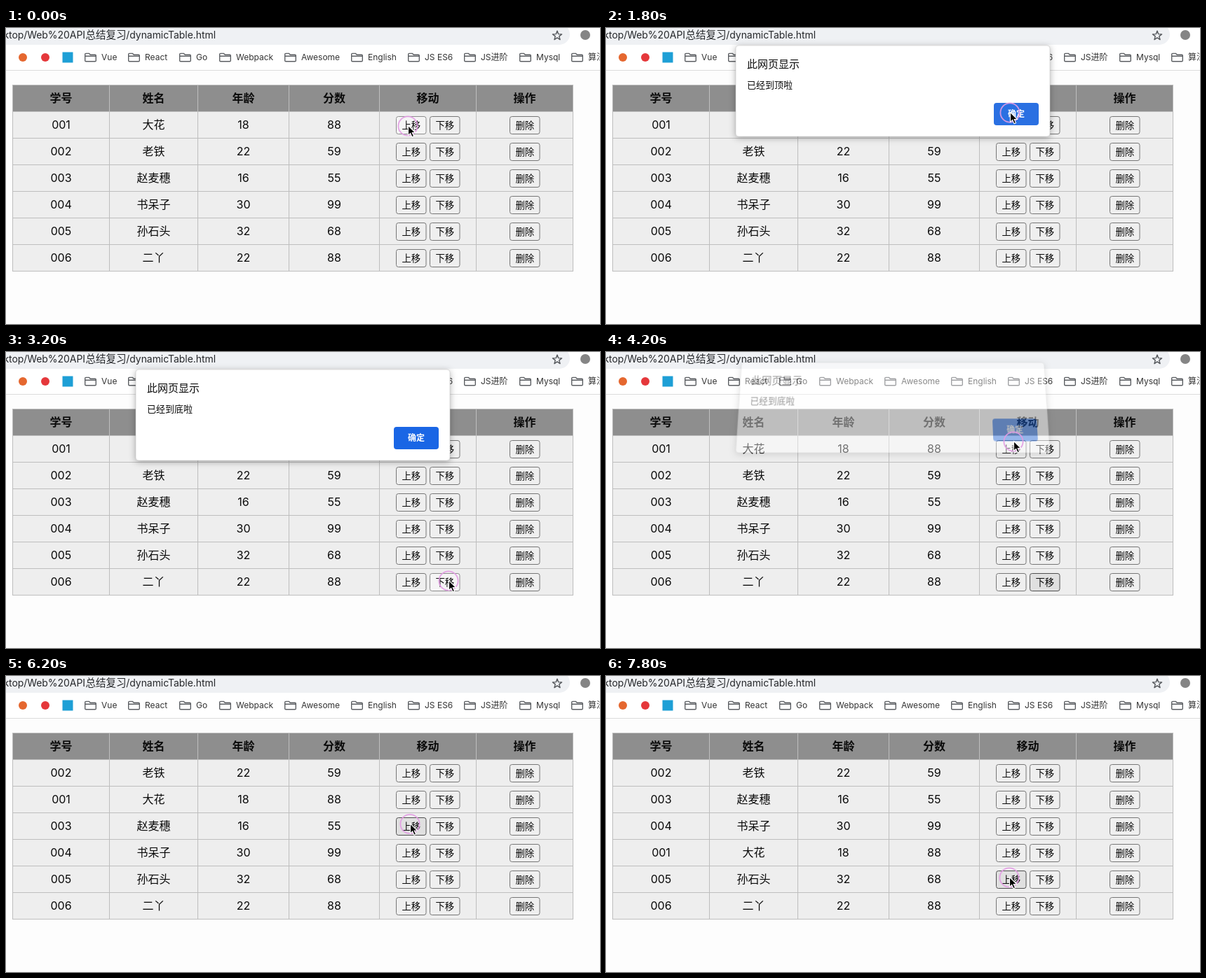
An HTML page for the animation above (8000 ms loop, 847 by 423 pixels).

```html
<!DOCTYPE html>
<html lang="zh-CN">
<head>
<meta charset="utf-8">
<title>dynamicTable</title>
<style>
  html, body { margin: 0; width: 100%; height: 100%; overflow: hidden; background: #fdfdfd; }
  svg {
    position: absolute; left: 0; top: 0; overflow: hidden;
    font-family: Inter, "Noto Sans CJK SC", "Noto Sans CJK", sans-serif;
  }
  #dialog {
    left: 185px; top: 25px; overflow: visible; transform-origin: 50% 100%;
    filter: drop-shadow(0 2px 5px rgba(0, 0, 0, .3));
  }
  #dialog.closing {
    opacity: .42;
    transform: translateY(-11px) perspective(600px) rotateX(10deg) scaleY(1.046);
  }
</style>
</head>
<body>
<svg id="page" width="847" height="423"></svg>
<svg id="dialog" width="448" height="130"></svg>
<svg id="pointer" width="847" height="423"></svg>
<script>
const STEP = 200, STEPS = 40, ROW = 38, TOP = 138.5;
const COLS = [9.5, 147.5, 273.5, 403.5, 532.5, 670.5, 808.5];
const HEADS = ['学号', '姓名', '年龄', '分数', '移动', '操作'];
const STUDENTS = [
  ['001', '大花', 18, 88],
  ['002', '老铁', 22, 59],
  ['003', '赵麦穗', 16, 55],
  ['004', '书呆子', 30, 99],
  ['005', '孙石头', 32, 68],
  ['006', '二丫', 22, 88]
];
const FOLDERS = [
  [112, 'Vue'], [174, 'React'], [247, 'Go'], [304, 'Webpack'], [397, 'Awesome'],
  [492, 'English'], [573, 'JS ES6'], [653, 'JS进阶'], [732, 'Mysql'], [806, '算法']
];
// pointer stops: step, x, y
const STOPS = [
  [0, 573, 140], [3, 573, 140], [6, 578, 123], [9, 576, 121], [10, 577, 122],
  [12, 635, 326], [14, 632, 327], [16, 631, 327], [19, 582, 128], [21, 581, 128],
  [23, 580, 132], [26, 576, 174], [28, 576, 174], [30, 576, 212], [32, 576, 211],
  [34, 576, 250], [36, 576, 250], [38, 575, 288], [39, 575, 288]
];
const SWAPS = [28, 32, 36];
const ALERTS = [
  { open: 1, close: 10, press: 0, row: 0, col: 0, text: '已经到顶啦' },
  { open: 15, close: 21, press: 14, row: 5, col: 1, text: '已经到底啦' }
];

const $ = id => document.getElementById(id);
const page = $('page'), dialog = $('dialog'), pointer = $('pointer');

function add(parent, tag, attrs, text) {
  const el = document.createElementNS('http://www.w3.org/2000/svg', tag);
  for (const k in attrs) el.setAttribute(k, attrs[k]);
  if (text !== undefined) el.textContent = text;
  return parent.appendChild(el);
}
const rect = (p, x, y, width, height, fill, more) =>
  add(p, 'rect', { x, y, width, height, fill, ...more });
const label = (p, x, y, size, text, more) =>
  add(p, 'text', { x, y, 'font-size': size, fill: '#0a0a0a', ...more }, text);
const mid = { 'text-anchor': 'middle' };
const end = { 'text-anchor': 'end' };
const center = i => (COLS[i] + COLS[i + 1]) / 2;

function drawBrowser() {
  rect(page, 0, 0, 847, 423, '#fdfdfd');
  rect(page, 0, 0, 847, 60, '#fff');
  rect(page, -30, -6, 834, 30, '#eff1f4', { rx: 15 });
  rect(page, 0, 60, 847, 1, '#dcdcdc');
  const url = { fill: '#26282b', 'letter-spacing': -.06 };
  label(page, 113, 15, 14, 'sktop/Web%20API', { ...url, ...end });
  label(page, 113.5, 15, 14.5, '总结复习', { fill: url.fill });
  label(page, 299, 15, 14, '/dynamicTable.html', { ...url, ...end });

  const star = Array.from({ length: 10 }, (_, i) => {
    const r = i % 2 ? 2.9 : 6.9, a = i * Math.PI / 5;
    return [786 + r * Math.sin(a), 11 - r * Math.cos(a)].map(v => v.toFixed(2));
  });
  add(page, 'polygon', {
    points: star.join(' '), fill: 'none', stroke: '#55585c',
    'stroke-width': 1.4, 'stroke-linejoin': 'round'
  });
  add(page, 'circle', { cx: 826, cy: 10, r: 7, fill: '#858585' });
  add(page, 'circle', { cx: 24, cy: 42, r: 6, fill: '#e5672f' });
  add(page, 'circle', { cx: 56, cy: 42, r: 6, fill: '#e5383b' });
  rect(page, 80.5, 34.5, 15, 15, '#1e9fd6');

  for (const [x, name] of FOLDERS) {
    add(page, 'path', {
      d: `M${x + .7} 37.6q0-1.2 1.2-1.2h4.6l1.8 1.8h6.8q1.2 0 1.2 1.2v7.2q0 1.2-1.2 1.2h-13.2q-1.2 0-1.2-1.2zM${x + .7} 40.2h15.6`,
      fill: 'none', stroke: '#5c5f63', 'stroke-width': 1.4
    });
    label(page, x + 24, 46.3, 12, name, { fill: '#333' });
  }
}

const rows = [], buttons = [];

function drawTable() {
  rect(page, 9.5, 81.5, 799, 38, '#8e8e8e');
  rect(page, 9.5, 119.5, 799, 228, '#eee');
  let d = '';
  for (let i = 0; i < 8; i++) d += `M9 ${81.5 + ROW * i}H809`;
  for (const x of COLS) d += `M${x} 81V348`;
  add(page, 'path', { d, stroke: '#bebebe', fill: 'none' });

  HEADS.forEach((h, i) => label(page, center(i), 105.7, 16, h, { ...mid, 'font-weight': 700 }));
  STUDENTS.forEach((s, r) => {
    const g = add(page, 'g', {});
    s.forEach((v, i) => label(g, center(i), TOP + 5.5, 16, v, mid));
    rows.push(g);
    buttons.push([[556.5, '上移'], [604.5, '下移'], [718.5, '删除']].map(([x, name]) => {
      const y = 127 + ROW * r;
      const box = rect(page, x, y - .5, 42.5, 25, '#efefef', { rx: 3 });
      label(page, x + 21.3, y + 16.8, 13.4, name, mid);
      return { box, x, y };
    }));
  });
}

function drawDialog() {
  rect(dialog, 0, 0, 448, 130, '#fff', { rx: 4, stroke: '#c4c4c4', 'stroke-width': .6 });
  label(dialog, 16, 32, 15, '此网页显示');
  const message = label(dialog, 16, 60.7, 13, '');
  const ok = rect(dialog, 368, 82, 64, 32, '#1a66e5', { rx: 4 });
  label(dialog, 400, 102, 12, '确定', { ...mid, fill: '#fff', 'font-weight': 700 });
  return { message, ok };
}

function drawPointer() {
  const g = add(pointer, 'g', {});
  add(g, 'circle', { r: 13.6, fill: 'none', stroke: '#e29be3', 'stroke-width': 1.8, opacity: .9 });
  add(g, 'path', {
    d: 'M.5-.5V13.3L3.6 10.4L6 15.7L8.5 14.6L6.2 9.5H10.6Z',
    fill: '#000', stroke: '#fff', 'stroke-width': 1.1
  });
  return g;
}

function pointerAt(k) {
  const i = Math.max(1, STOPS.findIndex(s => s[0] >= k));
  const [k0, x0, y0] = STOPS[i - 1], [k1, x1, y1] = STOPS[i];
  const u = (k - k0) / (k1 - k0), e = u * u * (3 - 2 * u);
  return [x0 + (x1 - x0) * e, y0 + (y1 - y0) * e];
}

drawBrowser();
drawTable();
const { message, ok } = drawDialog();
const arrow = drawPointer();

function render(k) {
  const [x, y] = pointerAt(k);
  arrow.setAttribute('transform', `translate(${x} ${y})`);

  const order = STUDENTS.map((_, i) => i);
  SWAPS.forEach((s, i) => {
    if (k >= s) [order[i], order[i + 1]] = [order[i + 1], order[i]];
  });
  order.forEach((id, slot) =>
    rows[id].setAttribute('transform', `translate(0 ${slot * ROW})`));

  const alert = ALERTS.find(a => k >= a.press && k <= a.close);
  buttons.forEach((set, r) => set.forEach((b, c) => {
    const over = alert ? alert.row === r && alert.col === c
      : x >= b.x && x <= b.x + 43 && y >= b.y && y <= b.y + 25;
    const pressed = over && alert && k < alert.close;
    b.box.setAttribute('fill', pressed ? '#f5f5f5' : over ? '#e0e0e0' : '#efefef');
    b.box.setAttribute('stroke', pressed ? '#8d8d8d' : over ? '#4f4f4f' : '#767676');
  }));

  const shown = alert && k >= alert.open;
  dialog.style.display = shown ? 'block' : 'none';
  if (!shown) return;
  dialog.classList.toggle('closing', k === alert.close);
  message.textContent = alert.text;
  const onOk = x > 553 && x < 617 && y > 107 && y < 139;
  ok.setAttribute('fill', onOk && k < alert.close ? '#2a70e2' : '#1a66e5');
}

function tick() {
  render(Math.floor(performance.now() / STEP) % STEPS);
  requestAnimationFrame(tick);
}
tick();
</script>
</body>
</html>
```
